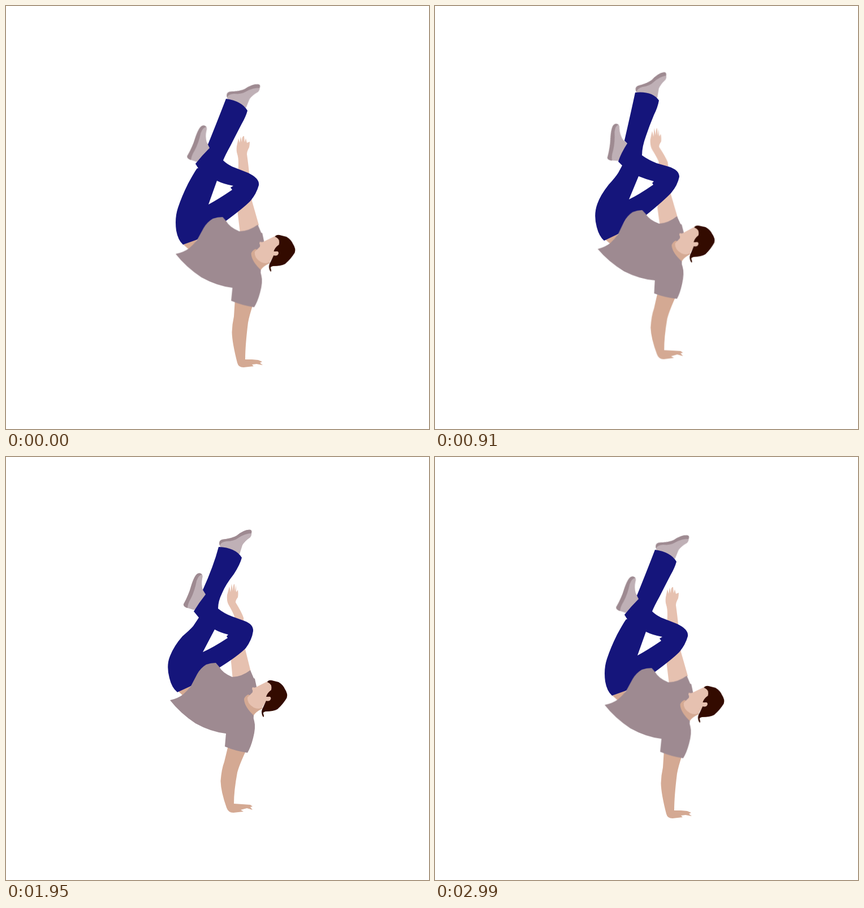
An HTML page without scripts for the animation above (3.12 s loop, 748x748 px).

```html
<!DOCTYPE html>
<html lang="en">
<head>
<meta charset="utf-8">
<title>Handstand dancer</title>
<style>
html, body { margin: 0; width: 100%; height: 100%; overflow: hidden; background: #fff; }
svg { display: block; width: 100vw; height: 100vh; }

.navy { fill: #15157b; fill-rule: evenodd; }
.shirt, .sole { fill: #9e8a91; }
.shoe { fill: #bfb0b6; }
.light { fill: #e6c1b0; }
.dark { fill: #d4a993; }
.hair { fill: #330b00; }

/* Six poses swing out and back; the second one is halfway between a and b. */
.move { animation: move 1560ms step-end infinite; }
.morph { animation: morph 1560ms step-end infinite; }
.move.morph { animation: move 1560ms step-end infinite, morph 1560ms step-end infinite; }

@keyframes move {
  0%, 91.66%, 100% { transform: var(--ta); animation-timing-function: steps(2); }
  16.66% { transform: var(--tb); }
  74.99% { transform: var(--tb); animation-timing-function: steps(2); }
  24.99%, 66.66% { transform: none; }
  33.33%, 58.33% { transform: var(--td); }
  41.66% { transform: var(--te); }
}
@keyframes morph {
  0%, 91.66%, 100% { d: var(--a); animation-timing-function: steps(2); }
  16.66% { d: var(--b); }
  74.99% { d: var(--b); animation-timing-function: steps(2); }
  24.99%, 66.66% { d: var(--c, var(--b)); }
  33.33%, 58.33% { d: var(--d, var(--b)); }
  41.66% { d: var(--e, var(--b)); }
}

.body {
  transform-origin: 388px 512px;
  --ta: translate(11.2px, 9.3px) rotate(.5deg) scale(1.02, 1);
  --tb: translate(.5px, 3.5px) rotate(2.5deg) scale(1, 1);
  --td: translate(.5px, -3.8px) rotate(-2deg);
  --te: translate(1px, -7.5px) rotate(-4deg);
}
.top-shoe {
  transform-origin: 405px 142px;
  --ta: translate(14px, 7.5px) rotate(5deg);
  --tb: translate(21.5px, 9px) rotate(5.6deg);
  --td: translate(-24px, -8px) rotate(-7.9deg);
  --te: translate(-47px, -15.5px) rotate(-15deg);
}
.low-shoe {
  transform-origin: 328px 233px;
  --ta: translate(7px, 5.5px) rotate(1.3deg);
  --tb: translate(14px, -2px) rotate(8deg);
  --td: translate(-16px, 5.5px) rotate(-13.6deg);
  --te: translate(-29px, 12px) rotate(-24deg);
}
.raised {
  transform-origin: 415px 385px;
  --ta: translate(0, 0) rotate(0deg) scale(1, 1);
  --tb: translate(5px, 4px) rotate(2.5deg) scale(1, .975);
  --td: translate(-3.5px, -4.5px) rotate(-2.7deg) scale(1, 1.03);
  --te: translate(-6px, -9px) rotate(-5.5deg) scale(1, 1.05);
  --a: path("M414 402L409 360L411 278Q411 268 409 262Q407 256 408 248L411 234L413 242L415 231L417 241Q417 229 421 230L422 241L424 234L426 242L431 240Q431 245 430 250Q426 257 426 262Q429 284 430 296L435 345L447 387L432 402Z");
  --b: path("M401 394L398 362L404 282Q401 274 394 262Q390 256 391 244L395 229L397 239L399 224L401 237Q402 223 404 225L405 238L407 226L407 239L410 235Q411 242 410 248Q406 253 406 257Q417 275 420 284L423 340L433 380L420 396Z");
}
.support {
  transform-origin: 407px 518px;
  --ta: translate(0, 0) rotate(0deg);
  --tb: translate(.5px, 3.5px) rotate(0deg);
  --td: translate(1px, -4.5px) rotate(-.8deg);
  --te: translate(2px, -8.5px) rotate(-1.6deg);
  --a: path("M405 518L438 524Q430 548 428 560Q423 600 423 625L435 625L446 626L453 629L449 631L454 635L443 633L435 634L438 637L420 639Q411 639 409 631Q400 596 399.5 577Q400 562 403 549Z");
  --b: path("M393 510L424 520Q412 546 409 558Q403 590 403 613L418 614L432 615L436 618L432 619L436 624L426 621L415 624L420 627L402 629Q393 629 390 620Q380 592 379.5 573Q381 552 386 539Z");
}
.legs {
  --a: path("M389 164Q417 168 427 185Q424 196 417 208Q404 233 397 247Q388 263 384 273Q390 279 400 284L428 295Q449 305 447 317Q443 332 432 345Q420 357 389 380L360 400L338 413L313 422Q304 414 301 397Q298 375 304 357Q311 336 322 314Q334 292 338 287L340 287L335 279Q346 265 360 251L357 245Q376 198 389 164ZM373 309Q385 315 402 318L397 321L400 325Q375 342 358 351Z");
  --b: path("M396 165Q424 168 436 187Q432 199 420 215Q404 234 396 245Q385 260 384 269Q394 279 407 285L429 293Q445 301 444 313Q440 327 431 339Q418 353 383 375L355 398L332 406L309 416Q299 408 294 392Q288 372 295 355Q302 337 319 321Q334 308 339 301L349 285L341 273Q350 259 364 244L361 237Q383 199 396 165ZM376 308Q387 314 400 316L396 319L399 323Q372 339 353 347Z");
  --c: path("M376 159Q406 160 417 178Q414 190 403 207Q388 226 382 241Q375 255 375 268Q386 277 400 282L422 290Q438 296 437 308Q435 323 424 338Q410 352 378 372L350 395L327 405L303 416Q293 408 289 391Q283 369 290 352Q297 334 312 317Q326 305 331 299L341 284L332 273Q341 258 353 243L348 235Q367 193 376 159ZM369 305Q380 311 393 314L390 317L392 320Q366 337 348 345Z");
  --d: path("M354 153Q384 150 396 167Q394 179 387 193Q379 212 373 230Q366 249 366 264Q377 272 392 278L413 284Q432 290 432 302Q429 317 418 330Q405 344 373 370L345 393L324 403L299 415Q290 407 286 391Q280 369 287 350Q292 335 307 316Q319 303 324 295L331 282L324 275Q329 260 340 243L335 238Q346 190 354 153ZM360 301Q372 306 387 310L384 313L386 316Q360 334 343 342Z");
  --e: path("M332 147Q361 141 374 156Q373 169 370 181Q369 200 364 219Q358 243 358 260Q368 267 384 274L404 279Q426 284 427 296Q423 311 412 323Q400 337 368 368L341 391L321 401L297 414Q288 406 284 391Q278 369 284 349Q289 335 302 316Q313 301 317 291L321 280L315 277Q318 262 328 244L322 240Q327 190 332 147ZM352 297Q364 302 381 306L378 309L380 312Q354 331 338 339Z");
}
</style>
</head>
<body>
<svg viewBox="0 0 748 748">
  <path class="raised light move morph"/>
  <path class="support dark move morph"/>

  <g class="top-shoe move">
    <path class="shoe" d="M378 156Q376 149 382 146Q400 144 408 139Q420 129 430 129L434 134Q435 138 432 142Q422 149 418 156L413 172L380 163Z"/>
    <path class="sole" d="M378 157Q375 148 382 146Q400 144 408 139Q420 129 430 128.500Q436 128 434 135Q423 135 411 143Q403 149 390 149Q380 150 378 157Z"/>
  </g>
  <g class="low-shoe move">
    <path class="shoe" d="M318 266L316 258L336 210L345 207Q349 208 347 215Q345 225 348 235L354 244L340 270L331 270Z"/>
    <path class="sole" d="M321 267Q313 265 314 260Q323 244 327 229Q333 209 339 206Q344 204 347 208Q341 208 337 219Q334 236 327 250Q321 260 321 267Z"/>
  </g>

  <path class="body dark move" d="M303 413L328 402L318 422L313 422Z"/>
  <path class="legs navy morph"/>

  <g class="body move">
    <path class="shirt" d="M290 430Q304 427 313 420Q321 413 327 405L338 384Q344 373 354 367Q362 364 371 364L377 371Q383 382 400 389Q416 389 432 377L438 391L440 392L443 406L440 430L438 456Q437 462 439 467Q442 478 437 497Q433 513 427 523Q406 520 387 512L389 489Q362 486 335 471Q308 453 290 430Z"/>
    <path class="dark" d="M428 420Q421 424 421 429Q422 442 438 457Q441 451 453 445L455 430Z"/>
    <path class="light" d="M464 396L444 406Q440 409 436 407L435 410Q437 413 436 416L427 425Q426 436 438 443Q446 447 453 443L460 432L469 432L470 424L474 405Z"/>
    <path class="hair" d="M462 398Q464 394 470 395L482 398Q490 403 493 410Q499 419 496.500 426Q490 437 480 446Q473 450 459 450Q454 451 455 454Q457 459 455 460Q452 456 452 450Q453 445 455 442L460 431Q467 433 468.500 427Q468 423 464 424L460 424Q462 417 469 412Q470 408 469 404Q467 400 462 398Z"/>
  </g>
</svg>
</body>
</html>
```
